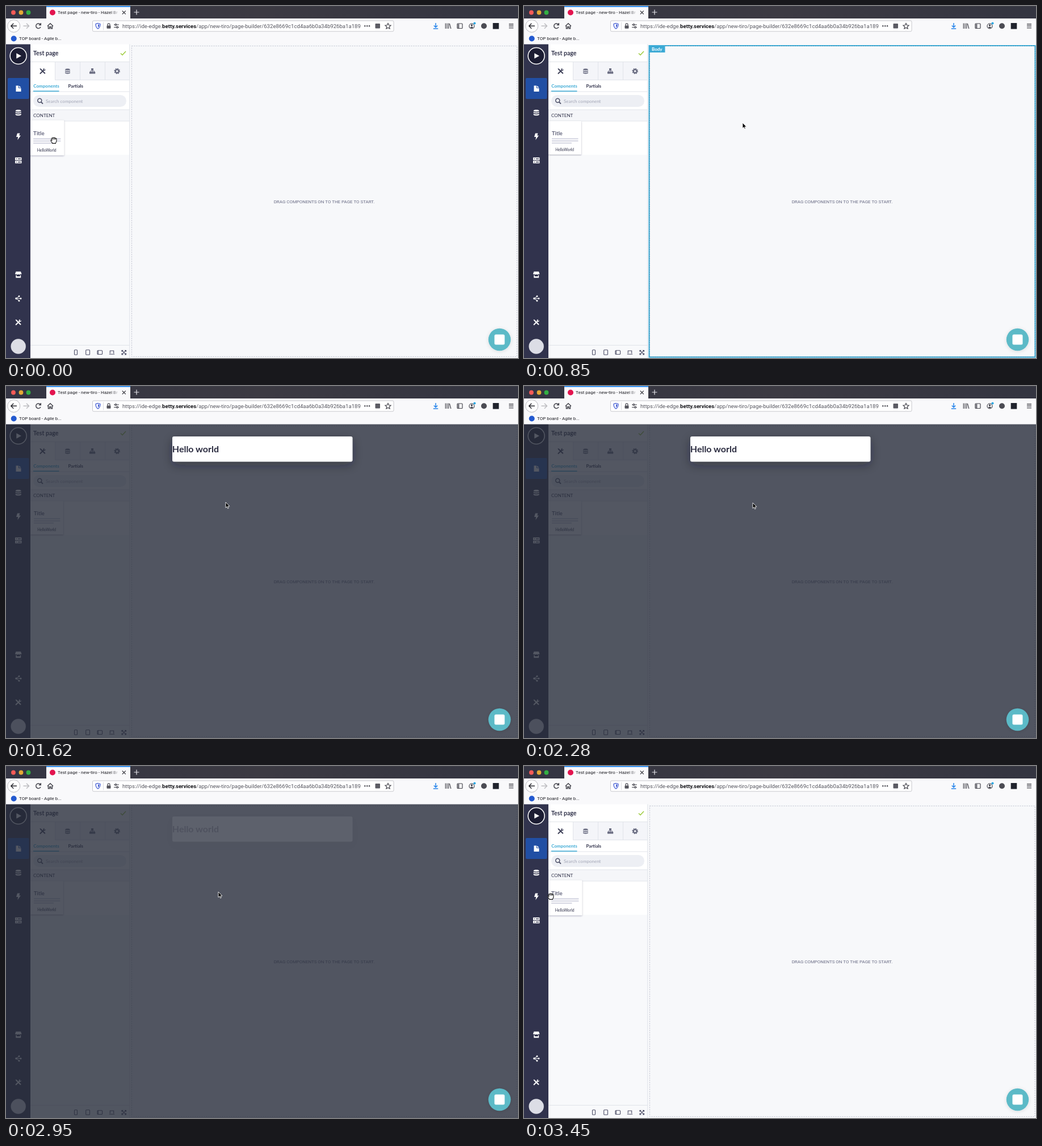
These frames come from a looping animation (902x621 px, 3480 ms). An HTML page:

```html
<!DOCTYPE html>
<html lang="en">
<head>
<meta charset="utf-8">
<title>Page builder</title>
<style>
html, body { margin: 0; width: 100%; height: 100%; overflow: hidden; background: #f7f8fa; }
svg { display: block; }
text { font: 8px Lato, sans-serif; fill: #30324a; white-space: pre; }
.chrome text, .hint { font-family: Roboto, sans-serif; }
.chrome text { fill: #1c1c22; }
.b { font-weight: 700; }
.line { fill: none; stroke: #45454d; stroke-width: 1.2; }
.dark { fill: #3f4159; }
.grey { fill: #6a6d82; }
.white { fill: #fff; }
.rule { stroke: #e1e4ea; stroke-width: 1; }
</style>
</head>
<body>
<svg width="902" height="621" viewBox="0 0 902 621">
<defs>
  <linearGradient id="bar"><stop stop-color="#343543"/><stop offset=".5" stop-color="#3c3a42"/><stop offset="1" stop-color="#343541"/></linearGradient>
  <linearGradient id="tabFade"><stop stop-color="#f9f9fb" stop-opacity="0"/><stop offset="1" stop-color="#f9f9fb"/></linearGradient>
  <filter id="cardShadow" x="-30%" y="-30%" width="160%" height="160%"><feDropShadow dx="0" dy="1" stdDeviation="1.3" flood-color="#22243c" flood-opacity=".35"/></filter>
  <filter id="modalShadow" x="-20%" y="-60%" width="140%" height="280%"><feDropShadow dx="0" dy="6" stdDeviation="9" flood-color="#16182c" flood-opacity=".4"/></filter>
  <filter id="chatShadow" x="-30%" y="-30%" width="160%" height="160%"><feDropShadow dx="0" dy="1" stdDeviation="3" flood-opacity=".12"/></filter>
  <g id="db">
    <path d="M-5-3.2C-5-5.6 5-5.6 5-3.2C5-1 -5-1-5-3.2ZM-5-1.6C-4 .2 4 .2 5-1.6V.3C4 2.1-4 2.1-5 .3ZM-5 1.8C-4 3.6 4 3.6 5 1.8V3.7C4 5.7-4 5.7-5 3.7Z"/>
  </g>
  <g id="tools">
    <path d="M-5-5L-3-4.6L4.8 3.2Q5.2 4.6 3.4 4.8L-4.4-3Z"/>
    <path d="M-5 3.6L1-2.2Q.6-5 3.6-5.2L2.4-3.4L3.6-2.3L5.3-3.5Q5.2-.3 2.2-.8L-3.6 5Q-5 5.6-5 3.6Z"/>
  </g>
  <g id="card">
    <rect x="43" y="203" width="58" height="59" rx="1" fill="#fff" filter="url(#cardShadow)"/>
    <text x="49" y="228.2" class="b" style="font-size:9.4px;fill:#62647c">Title</text>
    <path d="M49 234.3H95.5M49 238H95.5M49 241.7H84" stroke="#d5d6e2" stroke-width="2"/>
    <text x="71.7" y="256" text-anchor="middle" style="font-size:6.6px">HelloWorld</text>
  </g>
</defs>

<!-- page -->
<rect y="67" width="902" height="554" fill="#f7f8fa"/>
<rect x="221.5" y="70.5" width="678.5" height="548" fill="none" stroke="#bfc2ce" stroke-dasharray="2 2"/>
<text class="hint" x="560.5" y="348" text-anchor="middle" style="font-size:7.95px;fill:#686b84">DRAG COMPONENTS ON TO THE PAGE TO START.</text>
<g id="body">
  <rect x="220.5" y="70" width="680" height="549.5" fill="none" stroke="#41aed8" stroke-width="2"/>
  <rect x="221" y="70.5" width="679.5" height="548.5" fill="none" stroke="#2d83a8" stroke-width=".7" stroke-dasharray="2 2"/>
  <rect x="220" y="70" width="28.5" height="12" fill="#3daad5"/>
  <text x="225" y="79" class="b white">Body</text>
</g>

<!-- component panel -->
<rect x="43" y="67" width="175" height="554" fill="#f8f9fb"/>
<rect x="43" y="67" width="175" height="195.5" class="white"/>
<rect x="86.5" y="98.5" width="131.5" height="32" fill="#f4f5f9"/>
<rect x="43" y="183" width="175" height="20" fill="#f5f6f9"/>
<path class="rule" fill="none" d="M43 98.5H218M86.5 98.5V130.5H218M130.5 98.5V130.5M174.5 98.5V130.5M43 151H218M43 183H218M43 203H218M43 598.5H218M217.7 67V621"/>
<text x="48" y="87" class="b" style="font-size:10.6px">Test page</text>
<path d="M202 83.5L205 86.5L211 80" fill="none" stroke="#9ccb3b" stroke-width="1.5"/>
<use href="#tools" x="64.5" y="115" class="dark"/>
<use href="#db" class="grey" transform="translate(108.5 115) scale(.9)"/>
<g class="grey">
  <path d="M150 110h4v3.5h-4zM147 116h3.4v3.5H147zM150.3 116h3.4v3.5h-3.4zM153.8 116h3.4v3.5h-3.4z"/>
  <path d="M152 113V116M148.5 116.5V114.7H155.5V116.5" fill="none" stroke="#6a6d82" stroke-width=".9"/>
</g>
<circle cx="195.7" cy="115" r="3" fill="none" stroke="#6a6d82" stroke-width="2.4"/>
<circle cx="195.7" cy="115" r="4.6" fill="none" stroke="#6a6d82" stroke-width="1.5" stroke-dasharray="1.8 1.81"/>
<text x="48.3" y="144" class="b" style="fill:#3ba9d4">Components</text>
<path d="M48 150.3H93.5" stroke="#3ba9d4" stroke-width="1.6"/>
<text x="109.5" y="144" class="b">Partials</text>
<rect x="48" y="157" width="164" height="21" rx="10.5" fill="#edeff4"/>
<circle cx="59.3" cy="166.8" r="3.5" class="line" style="stroke:#4d5068;stroke-width:1.5"/>
<path d="M61.8 169.3L65 172.5" stroke="#4d5068" stroke-width="1.8"/>
<text x="70" y="170.7" style="fill:#a3a6b6">Search component</text>
<text x="48" y="196.4" style="font-size:8.1px">CONTENT</text>
<use href="#card" id="rest"/>
<g class="line" style="stroke:#4c4e66;stroke-width:1.1">
  <rect x="120.5" y="606.7" width="5" height="8.6" rx="1"/>
  <rect x="140.7" y="606.7" width="6.8" height="8.6" rx="1"/>
  <rect x="161" y="607.7" width="8.6" height="6.8" rx="1"/><path d="M162.3 608V614"/>
  <path d="M183.3 613V608.3H189.7V613M181.8 614.3H191.2"/>
  <path d="M204 610V607.5H206.5M209 607.5H211.5V610M211.5 612.5V615H209M206.5 615H204V612.5M204.5 608L211 614.5M211 608L204.5 614.5"/>
</g>

<!-- sidebar -->
<rect y="67" width="43" height="554" fill="#31334d"/>
<rect x="3" y="127" width="37.5" height="37" rx="2" fill="#214fa4"/>
<circle cx="21.7" cy="88" r="14.5" fill="#1c1d33" stroke="#fff" stroke-width="1.5"/>
<g class="white">
  <path d="M18.3 83.3L27 88L18.3 92.7Z"/>
  <path d="M17.5 140.5H22V145H26.5V151H17.5ZM23 140.5L26.5 144H23Z"/>
  <use href="#db" x="21.7" y="188"/>
  <path d="M20 224.5H24.5L23.2 228.5H26L20.3 236.5L21.3 231H18Z"/>
  <path d="M16 267.3h11.5v4.6H16zM16 273h11.5v4.6H16z"/>
  <path d="M17.5 468.5H26L27.5 472.5Q26.5 474.5 25 473Q23.3 474.8 21.7 473Q20 474.8 18.3 473Q17 474.5 16 472.5ZM17.3 475H18.8V477H24.7V475H26.2V479.5H17.3Z"/>
  <circle cx="18" cy="516" r="1.8"/><circle cx="23" cy="512" r="1.5"/><circle cx="26" cy="516" r="1.5"/><circle cx="23" cy="520" r="1.5"/>
  <use href="#tools" x="21.7" y="558"/>
</g>
<path d="M23 512L18 516L23 520M18 516H26" fill="none" stroke="#fff"/>
<g fill="#31334d"><circle cx="18.5" cy="269.6" r=".8"/><circle cx="18.5" cy="275.3" r=".8"/><path d="M21 269h5v1.2h-5zM21 274.7h5v1.2h-5z"/></g>
<circle cx="21.7" cy="600.5" r="13.2" fill="#dcdde5"/>

<!-- dialog -->
<rect id="shade" y="67" width="902" height="554" fill="#282d3b"/>
<g id="modal">
  <rect x="293" y="89" width="317.5" height="44.5" rx="3" fill="#fff" filter="url(#modalShadow)"/>
  <text x="292.8" y="117" class="b" style="font-size:16px;fill:#2b2c40">Hello world</text>
</g>
<circle cx="869.5" cy="588.5" r="19.7" fill="#5bbac7" filter="url(#chatShadow)"/>
<rect x="860.5" y="579.5" width="18" height="18" rx="2.5" class="white"/>

<!-- browser window -->
<g class="chrome">
  <rect width="902" height="22" fill="url(#bar)"/>
  <rect width="902" height="1" fill="#3f4049"/>
  <rect y="22" width="902" height="45.5" fill="#f9f9fb"/>
  <circle cx="13" cy="11.5" r="3.9" fill="#fc5b57"/><circle cx="26.5" cy="11.5" r="3.9" fill="#e5a935"/><circle cx="39.5" cy="11.5" r="3.9" fill="#33b044"/>
  <rect x="71" y="1" width="148" height="22" fill="#f9f9fb"/>
  <rect x="71" y="0" width="148" height="1.8" fill="#2a8df5"/>
  <circle cx="82" cy="11.5" r="5" fill="#e3144f"/>
  <text x="91" y="14.2">Test page - new-tiro - Hazel Br</text>
  <rect x="184" y="4" width="16" height="15" fill="url(#tabFade)"/>
  <rect x="200" y="4" width="18" height="15" fill="#f9f9fb"/>
  <path class="line" d="M204.8 8.5L210.8 14.5M210.8 8.5L204.8 14.5"/>
  <path class="line" style="stroke:#e4e4ea" d="M230 6.5V15.5M225.5 11H234.5"/>

  <circle cx="13.7" cy="35.3" r="11" fill="#fff" stroke="#b9b9be"/>
  <path class="line" style="stroke-width:1.5;stroke:#2a2a30" d="M19 35.3H9M13.3 30.8L8.8 35.3L13.3 39.8"/>
  <path class="line" style="stroke-width:1.5;stroke:#bcbcc0" d="M30.5 35.3H40M36 30.8L40.5 35.3L36 39.8"/>
  <path class="line" style="stroke-width:1.5" d="M60.8 33A4.3 4.3 0 1 0 61 37M61.3 30V33.5H57.8"/>
  <path class="line" style="stroke-width:1.5" d="M73 35.5L78 30.8L83 35.5M74.5 35V39.8H76.8V36.8H79.2V39.8H81.5V35"/>

  <rect x="152.5" y="26" width="530.5" height="18.8" rx="2" fill="#fff" stroke="#c8c8cd"/>
  <path d="M162 30.5L166 31.8Q166 38 162 40.3Q158 38 158 31.8Z" fill="#fff" stroke="#3a55d0" stroke-width="1.2"/>
  <path d="M162 32.3V38.3Q164.3 36.3 164.4 33Z" fill="#3a55d0"/>
  <path d="M171.5 28.5V42.5" stroke="#dcdce0"/>
  <rect x="177.5" y="34.5" width="7" height="5.3" rx="1" fill="#55555d"/>
  <path class="line" d="M179 35V32.8A2 2 0 0 1 183 32.8V35"/>
  <path class="line" d="M190 33H192M195 33H199M190 37.5H194.5M197.5 37.5H199"/>
  <circle class="line" cx="193.3" cy="33" r="1.4"/><circle class="line" cx="196" cy="37.5" r="1.4"/>
  <text x="205" y="38.7" style="font-size:9.6px;fill:#55555e">https://ide-edge.<tspan class="b" fill="#15151a">betty.services</tspan>/app/new-tiro/page-builder/632e8669c1cd4aa6b0a34b926ba1a189</text>
  <g fill="#45454d"><circle cx="632.3" cy="35.3" r="1.2"/><circle cx="636.2" cy="35.3" r="1.2"/><circle cx="640.1" cy="35.3" r="1.2"/></g>
  <rect x="650.5" y="31" width="8.5" height="8.5" rx="1" fill="#5c5c64"/>
  <path class="line" d="M673 30.5L674.5 33.8L678 34.2L675.4 36.5L676.1 40L673 38.2L669.9 40L670.6 36.5L668 34.2L671.5 33.8Z"/>

  <path class="line" style="stroke:#2483ea;stroke-width:1.5" d="M757 30V37.5M753.8 34.5L757 37.7L760.2 34.5M752.8 40H761.2"/>
  <path class="line" d="M774.3 30.5V40M777 30.5V40M779.7 30.5V40M781.3 31L783.8 40"/>
  <rect class="line" x="795" y="31" width="9" height="8.5" rx="1"/><path d="M795.5 31.5h3v7.5h-3z" fill="#77777f"/>
  <circle class="line" cx="820.5" cy="35.5" r="4.5"/><circle cx="820.5" cy="34" r="1.7" fill="#45454d"/><path d="M817.5 38Q820.5 35 823.5 38Q820.5 40.5 817.5 38Z" fill="#45454d"/>
  <circle cx="825.5" cy="30.5" r="2.1" fill="#2aa5e0"/>
  <circle cx="842" cy="35.3" r="5" fill="#4b4b53"/>
  <rect x="857.7" y="30" width="10.6" height="10.6" fill="#20232d"/>
  <path class="line" style="stroke-width:1.4" d="M886 32H894M886 35.3H894M886 38.6H894"/>

  <circle cx="13.7" cy="57.5" r="5" fill="#2359cf"/>
  <text x="23" y="60.3">TOP board - Agile b...</text>
</g>

<use href="#card" id="ghost" opacity=".65"/>
<g id="cursor">
  <path id="arrow" d="M0 0V9L2.1 7.2L3.4 10.3L4.9 9.6L3.6 6.6H6.4Z" fill="#000" stroke="#fff" stroke-width=".8"/>
  <g id="hand" fill="#fff" stroke="#111" stroke-width="1" stroke-linejoin="round">
    <path d="M-3.6-1.5C-4-4-2-4.5-1.7-3.3C-1.5-5 .3-5 .6-3.6C1-4.9 2.6-4.6 2.7-3C3.5-3.7 4.7-3.2 4.6-1.7V1C4.6 3 3.2 3.5 3.2 5H-2C-2 3.5-5.2 1.8-4.7 0C-4.3-1-3.2-.3-2.7 .4Z"/>
    <path d="M-1.7-3.3V-1.2M.6-3.6V-1.2M2.7-3V-1.1" fill="none"/>
  </g>
</g>
</svg>
<script>
const LOOP = 3480;
const GRAB = [84, 237];
// time, x, y of the pointer
const path = [
  [0, ...GRAB], [90, ...GRAB], [620, 380, 208], [850, 385, 206], [1020, 386, 206],
  [1620, 387, 205], [2000, 387, 205], [2280, 403, 206], [2450, 403, 206],
  [2800, 374, 222], [2960, 374, 222], [3400, 47, 230], [LOOP, 47, 230]
];
const el = id => document.getElementById(id);
const clamp = v => Math.max(0, Math.min(1, v));
const ramp = (t, from, to) => clamp((t - from) / (to - from));
const fade = (t, inFrom, inTo, outFrom, outTo) => ramp(t, inFrom, inTo) - ramp(t, outFrom, outTo);
const show = (id, on) => { el(id).style.display = on ? '' : 'none'; };

function pointer(t) {
  const i = path.findIndex(p => p[0] > t);
  const [t0, x0, y0] = path[i - 1], [t1, x1, y1] = path[i];
  const u = ramp(t, t0, t1), k = u * u * (3 - 2 * u);
  return [x0 + (x1 - x0) * k, y0 + (y1 - y0) * k];
}

function draw(now) {
  const t = now % LOOP;
  const [x, y] = pointer(t);
  const dragging = t > 90 && t < 700;
  const hover = !dragging && x < 102;

  el('cursor').setAttribute('transform', `translate(${x} ${y}) scale(1.08)`);
  show('hand', hover);
  show('arrow', !hover);

  el('rest').setAttribute('transform', hover ? 'translate(72 232.5) scale(1.04) translate(-72 -232.5)' : '');
  show('ghost', dragging);
  el('ghost').setAttribute('transform', `translate(${x - GRAB[0]} ${y - GRAB[1]})`);
  show('body', x > 220 && t < 900);

  el('shade').setAttribute('opacity', 0.8 * fade(t, 890, 980, 2965, 3060));
  el('modal').setAttribute('opacity', fade(t, 940, 1056, 2860, 2958));
  requestAnimationFrame(draw);
}
requestAnimationFrame(draw);
</script>
</body>
</html>
```
